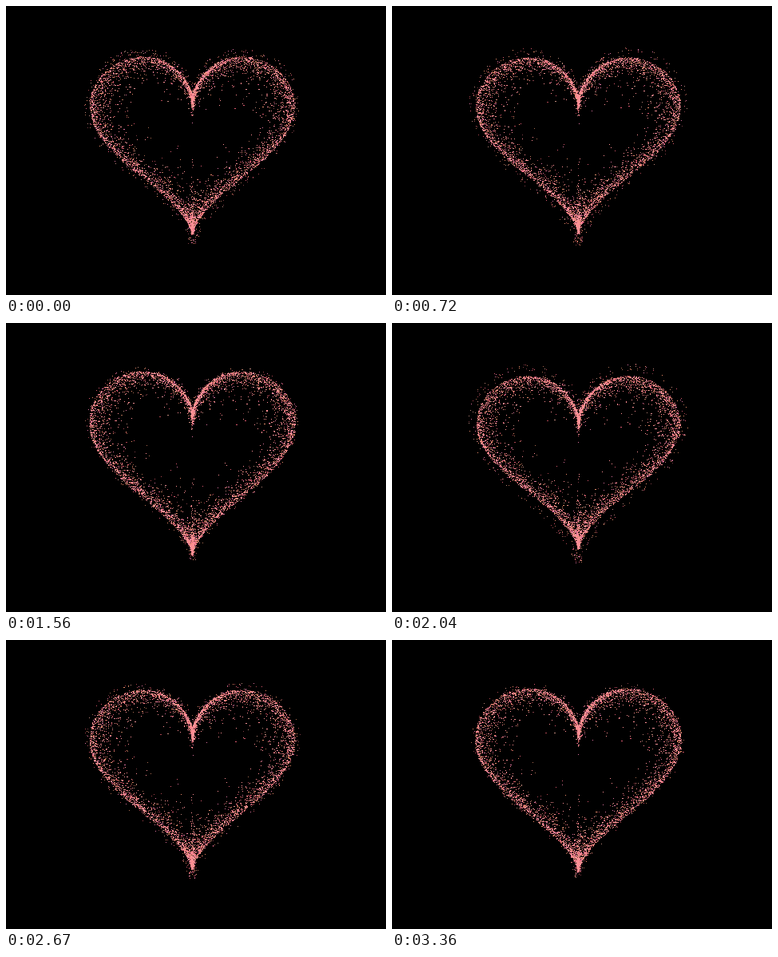
Recreate the animation shown at these times as an HTML page with a canvas. Size 476x362 px, loop 3.39 s.

```html
<!DOCTYPE html>
<html lang="en">
<head>
<meta charset="utf-8">
<title>Beating heart</title>
<style>
  html, body { margin: 0; width: 476px; height: 362px; overflow: hidden; background: #000; }
  canvas { display: block; }
</style>
</head>
<body>
<canvas id="stage" width="476" height="362"></canvas>
<script>
const ctx = document.getElementById('stage').getContext('2d');
const LOOP = 3390, STEP = 34.3, BEAT = 1770, PHASE = 50;
const CX = 233, CY = 155.2;
const BASE = '#ff8f94';
const TINTS = ['#d8586e', '#e88a68', '#a86a50', '#d8709c', '#b88478', '#a8444e', '#7c3c44'];

function seeded(seed) {
  return () => {
    seed = (seed + 0x6d2b79f5) | 0;
    let n = Math.imul(seed ^ (seed >>> 15), seed | 1);
    n ^= n + Math.imul(n ^ (n >>> 7), n | 61);
    return ((n ^ (n >>> 14)) >>> 0) / 4294967296;
  };
}

// Offset from the centre of the heart curve, y pointing down.
function heart(t, unitX, unitY) {
  const { cos, sin } = Math;
  return {
    x: unitX * 16 * sin(t) ** 3,
    y: -unitY * (13 * cos(t) - 5 * cos(2 * t) - 2 * cos(3 * t) - cos(4 * t)),
  };
}

// Points of the outline, pulled towards the centre by a logarithmic scatter.
function scatter(count, beta, rand) {
  const pull = () => 1 + beta * Math.log(1 - rand());
  return Array.from({ length: count }, () => {
    const p = heart(rand() * 2 * Math.PI, 7.98, 7.7);
    return {
      x: p.x * pull(),
      y: p.y * pull(),
      color: rand() < 0.6 ? TINTS[Math.floor(rand() * TINTS.length)] : BASE,
      width: rand() < 0.15 ? 2 : 1,
    };
  });
}

const rand = seeded(7);
const body = [
  ...scatter(900, 0, rand),
  ...scatter(3000, 0.05, rand),
  ...scatter(2500, 0.12, rand),
].sort((a, b) => (a.color === BASE) - (b.color === BASE));

function dot(x, y, width, color) {
  ctx.fillStyle = color;
  ctx.fillRect(Math.round(CX + x), Math.round(CY + y), width, 1);
}

function draw(picture) {
  const rand = seeded(1000 + picture * 977);
  const jitter = size => (rand() * 2 - 1) * size;
  const squeeze = Math.sin((picture * STEP + PHASE) / BEAT * 2 * Math.PI);
  ctx.fillStyle = '#000';
  ctx.fillRect(0, 0, 476, 362);

  // The halo swells while the body contracts.
  const swell = 1.75 + 2.75 * squeeze;
  for (let i = 0; i < 400; i++) {
    const p = heart(rand() * 2 * Math.PI, 8.06, 8.06);
    const k = 1 + swell / Math.hypot(p.x, p.y);
    dot(p.x * k + jitter(5), p.y * k + jitter(5), 1, TINTS[i % TINTS.length]);
  }
  for (const p of body) {
    const r = Math.hypot(p.x, p.y) || 1;
    dot(p.x - 1.2 * squeeze * p.x / r + jitter(1),
        p.y - 4.8 * squeeze * p.y / r + jitter(1), p.width, p.color);
  }
}

let shown = -1;
function tick() {
  const picture = Math.floor(performance.now() % LOOP / STEP);
  if (picture !== shown) draw(shown = picture);
  requestAnimationFrame(tick);
}
tick();
</script>
</body>
</html>
```
